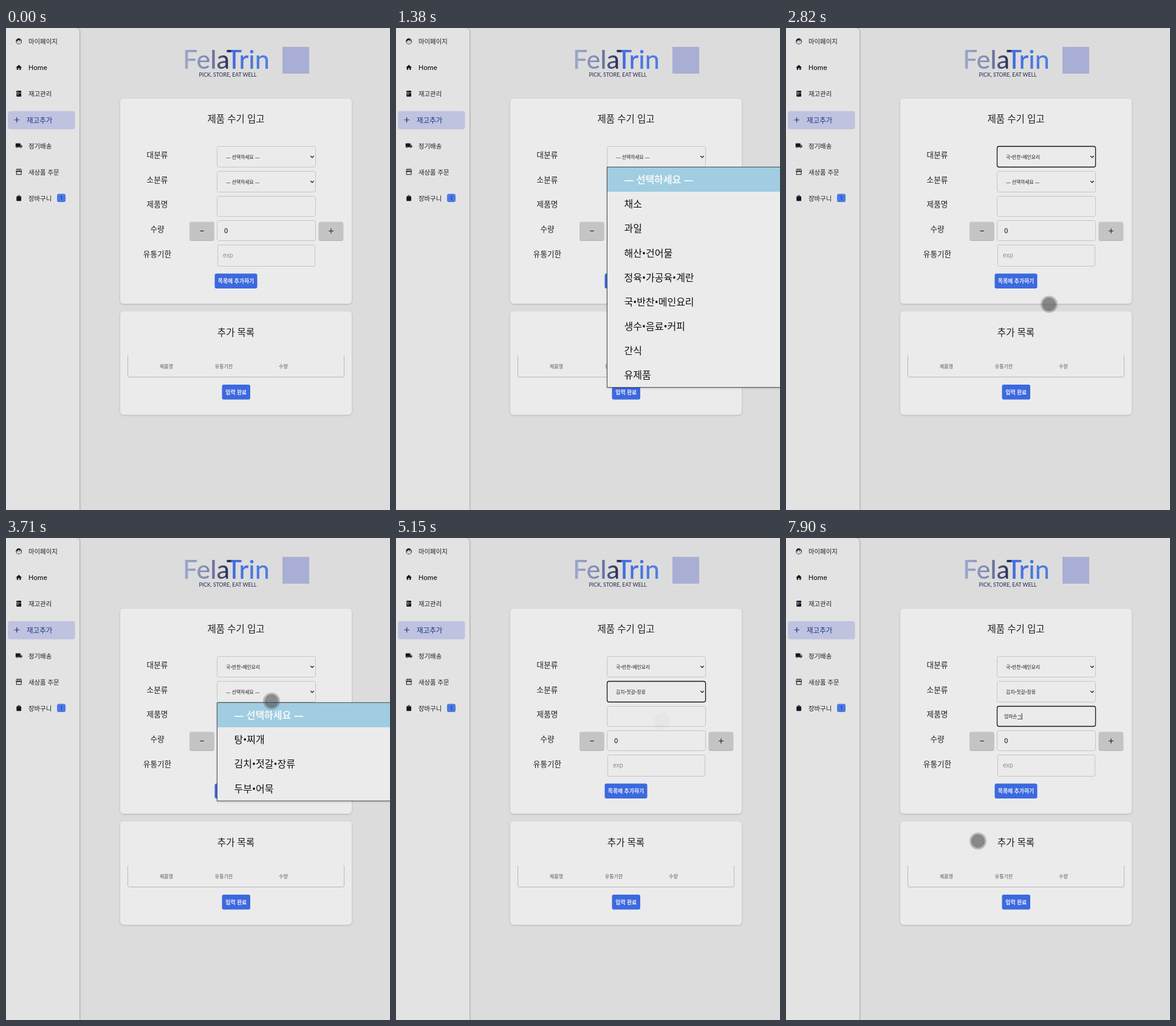
These frames come from a looping animation (632 px wide and 792 px high, 8 s). An HTML page:

```html
<!DOCTYPE html>
<html>
<head>
<meta charset="utf-8">
<title>Stock entry form</title>
<style>
  html, body { margin: 0; width: 100%; height: 100%; overflow: hidden; background: #dcdcdc; }
  svg { display: block; width: 632px; height: 792px; }
  text { font-family: "Open Sans", "Noto Sans CJK KR", "Noto Sans CJK", sans-serif; white-space: pre; }
  .latin { font-family: Inter, sans-serif; }
  .brand { font-family: Lato, sans-serif; }
</style>
</head>
<body>
<svg id="stage" viewBox="0 0 632 792" xmlns="http://www.w3.org/2000/svg">
  <defs>
    <linearGradient id="ink" gradientUnits="userSpaceOnUse" x1="292" y1="0" x2="444" y2="0">
      <stop offset="0" stop-color="#9da9cd"/>
      <stop offset=".28" stop-color="#7c86b3"/>
      <stop offset=".42" stop-color="#43476f"/>
      <stop offset=".51" stop-color="#22254c"/>
      <stop offset=".52" stop-color="#3f6cdf"/>
      <stop offset="1" stop-color="#5483e4"/>
    </linearGradient>
    <filter id="soft" x="-20%" y="-20%" width="140%" height="140%">
      <feDropShadow dx="0" dy="1" stdDeviation="1.5" flood-opacity=".2"/>
    </filter>
    <filter id="lift" x="-20%" y="-20%" width="140%" height="150%">
      <feDropShadow dx="0" dy="1" stdDeviation=".7" flood-opacity=".4"/>
    </filter>
  </defs>
</svg>
<script>
const LOOP = 8000;
const NS = "http://www.w3.org/2000/svg";
const stage = document.getElementById("stage");
const DARK = "#1d2026", PANEL = "#ebebeb", LINE = "#c5c5c8", BLUE = "#3c69e0";

function el(tag, attrs, parent = stage) {
  const node = document.createElementNS(NS, tag);
  for (const key in attrs) node.setAttribute(key, attrs[key]);
  parent.appendChild(node);
  return node;
}

// Text is placed by its vertical centre.
function text(x, cy, str, size, attrs = {}, parent = stage) {
  const node = el("text", { x, y: cy + size * 0.38, "font-size": size, fill: DARK, "font-weight": 500, ...attrs }, parent);
  node.textContent = str;
  return node;
}

function box(x, y, width, height, rx, attrs, parent = stage) {
  return el("rect", { x, y, width, height, rx, ...attrs }, parent);
}

const show = (node, on) => node.setAttribute("visibility", on ? "visible" : "hidden");
const mid = { "text-anchor": "middle" };

function buildSidebar() {
  el("path", { d: "M0 0H116Q121.500 0 121.500 6V792H0Z", fill: "#e3e3e3", filter: "url(#soft)" });
  el("path", { d: "M116 0Q121.500 0 121.500 6V792", fill: "none", stroke: "#adadad", "stroke-width": 1 });
  box(3, 136.500, 110.500, 30, 4, { fill: "#bfc3e0" });

  const items = [
    [22, "마이페이지", "M12 2a10 10 0 100 20 10 10 0 000-20zM12 4a8 8 0 018 8 8 8 0 01-16 0q5-1 7-5 3 4 8 3-3-6-7-6zM8 12h2v2.500H8zM14 12h2v2.500h-2z"],
    [65, "Home", "M10 20v-6h4v6h5v-8h3L12 3 2 12h3v8z"],
    [108, "재고관리", "M6 2h12a2 2 0 012 2v5H4V4a2 2 0 012-2zM8 5v3h2V5zM4 10.500h16V20a2 2 0 01-2 2H6a2 2 0 01-2-2zM8 12v5h2v-5z"],
    [193.500, "정기배송", "M20 8h-3V4H3c-1.100 0-2 .9-2 2v11h2a3 3 0 006 0h6a3 3 0 006 0h2v-5zM6 18.500a1.500 1.500 0 110-3 1.500 1.500 0 010 3zM19.500 9.500l2 2.500H17V9.500zM18 18.500a1.500 1.500 0 110-3 1.500 1.500 0 010 3z"],
    [236.500, "새상품 주문", "M4 2h16l2 7-1 3v10H3V12L2 9zM5 4L4 9h4V4zM10 4v5h4V4zM16 4v5h4l-1-5zM5 12v8h14v-8z"],
    [279.500, "장바구니", "M18 6h-2a4 4 0 00-8 0H6a2 2 0 00-2 2v12a2 2 0 002 2h12a2 2 0 002-2V8a2 2 0 00-2-2zM12 4a2 2 0 012 2h-4a2 2 0 012-2z"]
  ];
  for (const [y, label, d] of items) {
    el("path", { d, fill: "#15181c", "fill-rule": "evenodd", transform: `translate(15.300 ${y - 6}) scale(.49)` });
    text(37, y + .5, label, 10.400, label === "Home" ? { class: "latin", "font-size": 11 } : {});
  }
  el("path", { d: "M13.500 151H22M17.750 146.750V155.250", stroke: "#22306a", "stroke-width": 1.200 });
  text(34, 151.500, "재고추가", 11.500, { fill: "#1c3484" });
  box(84, 272.500, 14, 13.500, 3, { fill: "#4b79e6" });
  text(91, 279.500, "1", 8.500, { ...mid, class: "latin", fill: "#22397c" });
}

function buildBrand() {
  el("text", { x: 291, y: 67, "font-size": 43, class: "brand", fill: "url(#ink)", "font-weight": 500 }).textContent = "FelaTrin";
  text(365, 77, "PICK, STORE, EAT WELL", 8.700, { ...mid, class: "brand", fill: "#33375a" });
  box(455, 31, 44, 44, 0, { fill: "#a9aed4" });
}

function card(y, height, title, titleY) {
  box(188, y, 381, height, 6, { fill: PANEL, filter: "url(#soft)" });
  text(378.500, titleY, title, 15.600, mid);
}

const field = (y, h = 34) => box(347.500, y, 162, h, 3, { fill: PANEL, stroke: LINE });

function select(y) {
  const frame = field(y);
  const value = text(362, y + 17.500, "", 7.800);
  el("path", { d: `M501.200 ${y + 15.700}l2.700 2.700 2.700-2.700`, fill: "none", stroke: "#15181c", "stroke-width": 1.300 });
  return { frame, value };
}

function blueButton(x, y, w, label) {
  box(x, y, w, 24.500, 3, { fill: BLUE });
  text(x + w / 2, y + 12.500, label, 8.900, { ...mid, fill: "#f0f1f6", "font-weight": 700 });
}

function stepButton(x, d) {
  box(x, 318.500, 40.500, 30, 3, { fill: "#c4c4c4", filter: "url(#lift)" });
  el("path", { d, stroke: "#1b2033", "stroke-width": 1.200 });
}

function popup(top, bottom, options) {
  const g = el("g", {});
  box(347.500, top + .5, 300, bottom - top, 0, { fill: PANEL, stroke: "#4c4f52", filter: "url(#soft)" }, g);
  box(348, top + 1, 290, 40, 0, { fill: "#a0cde2" }, g);
  options.forEach((label, i) => {
    const head = i === 0;
    text(375.500, top + 21 + i * 40.150, label, 16, { fill: head ? "#f3f6f8" : "#101113", "font-weight": head ? 700 : 500 }, g);
  });
  return g;
}

buildSidebar();
buildBrand();

card(116, 337, "제품 수기 입고", 149.500);
["대분류", "소분류", "제품명", "수량", "유통기한"].forEach((label, i) =>
  text(249, 208 + i * 40.750, label, 12.600, mid));
const major = select(194.500);
const minor = select(235.500);
const nameField = field(276.500, 33);
field(316.500, 33);
box(348.500, 356.500, 160, 35, 2, { fill: PANEL, stroke: LINE });
text(359, 333.500, "0", 10, { class: "latin" });
text(357, 373.500, "exp", 9.800, { class: "latin", fill: "#8f8f92", "font-weight": 400 });
stepButton(302, "M319.500 333.500H325.500");
stepButton(514.700, "M531 333.500H539M535 329.500V337.500");
blueButton(343.500, 403.500, 70, "목록에 추가하기");

card(465.500, 170, "추가 목록", 500);
box(200, 540, 357, 33.500, 2, { fill: PANEL });
el("path", { d: "M200.500 538V571Q200.500 573.500 203 573.500H554Q556.500 573.500 556.500 571V538", fill: "none", stroke: "#b9b9bb" });
[[264, "제품명"], [358.500, "유통기한"], [456.500, "수량"]].forEach(([x, label]) =>
  text(x, 556, label, 8, { ...mid, fill: "#55575b", "font-weight": 400 }));
blueButton(355.500, 586, 46.500, "입력 완료");

const typed = text(359, 293, "", 7.800);
const underline = el("path", { stroke: DARK, "stroke-width": .8 });
const caret = el("path", { stroke: "#15181c", "stroke-width": .9 });

const HINT = "— 선택하세요 —";
const majorList = popup(228, 590, [HINT, "채소", "과일", "해산•건어물", "정육•가공육•계란", "국•반찬•메인요리", "생수•음료•커피", "간식", "유제품"]);
const minorList = popup(270, 431.500, [HINT, "탕•찌개", "김치•젓갈•장류", "두부•어묵"]);

const dot = el("g", {});
el("circle", { r: 14, fill: "#464646", "fill-opacity": .3 }, dot);
el("circle", { r: 10.700, fill: "#464646", "fill-opacity": .42, stroke: "#464646", "stroke-opacity": .25 }, dot);

// Each touch: start, x, y, time held at full strength.
const TAPS = [
  [750, 430, 212, 160], [2540, 433, 454, 190], [3430, 437, 268, 160],
  [4400, 437, 373, 160], [5145, 438, 300, 160], [6370, 316, 498, 9999]
];
const FADE_IN = 110, FADE_OUT = 300, REACT = 140;
const [openMajor, pickMajor, openMinor, pickMinor, focusName] = TAPS.map(tap => tap[0] + REACT);

const TYPING = [
  [0, ""], [6790, "ㅇ"], [6990, "어"], [7200, "엄"], [7340, "엄ㅁ"], [7480, "엄마"],
  [7620, "엄맛"], [7690, "엄마소"], [7760, "엄마손"], [7900, "엄마손ㄱ"]
];

const clamp = v => Math.max(0, Math.min(1, v));
const within = (t, a, b) => t >= a && t < b;

function focus(frame, on) {
  frame.setAttribute("stroke", on ? "#17181c" : LINE);
  frame.setAttribute("stroke-width", on ? 1.300 : 1);
}

function drawTouch(t) {
  const tap = TAPS.filter(([start]) => t >= start).pop();
  if (!tap) return dot.setAttribute("opacity", 0);
  const [start, x, y, hold] = tap;
  const age = t - start;
  const alpha = Math.min(clamp(age / FADE_IN), clamp(1 - (age - FADE_IN - hold) / FADE_OUT));
  dot.setAttribute("transform", `translate(${x} ${y})`);
  dot.setAttribute("opacity", alpha);
}

function drawTyping(t) {
  const word = TYPING.filter(([start]) => t >= start).pop()[1];
  const end = 359.300 + word.length * 7.180;
  typed.textContent = word;
  underline.setAttribute("d", `M${end - 7} 297.500H${end}`);
  show(underline, word !== "");
  caret.setAttribute("d", `M${end + .2} 288V298`);
  show(caret, within(t, focusName, focusName + 500) || t >= 6380);
}

function render(t) {
  show(majorList, within(t, openMajor, pickMajor));
  show(minorList, within(t, openMinor, pickMinor));
  major.value.textContent = t < pickMajor ? HINT : "국•반찬•메인요리";
  minor.value.textContent = t < pickMinor ? HINT : "김치•젓갈•장류";
  focus(major.frame, within(t, pickMajor, openMinor));
  focus(minor.frame, within(t, pickMinor, focusName));
  focus(nameField, t >= focusName);
  drawTyping(t);
  drawTouch(t);
}

const begin = performance.now();
function tick() {
  render((performance.now() - begin) % LOOP);
  requestAnimationFrame(tick);
}
tick();
</script>
</body>
</html>
```
